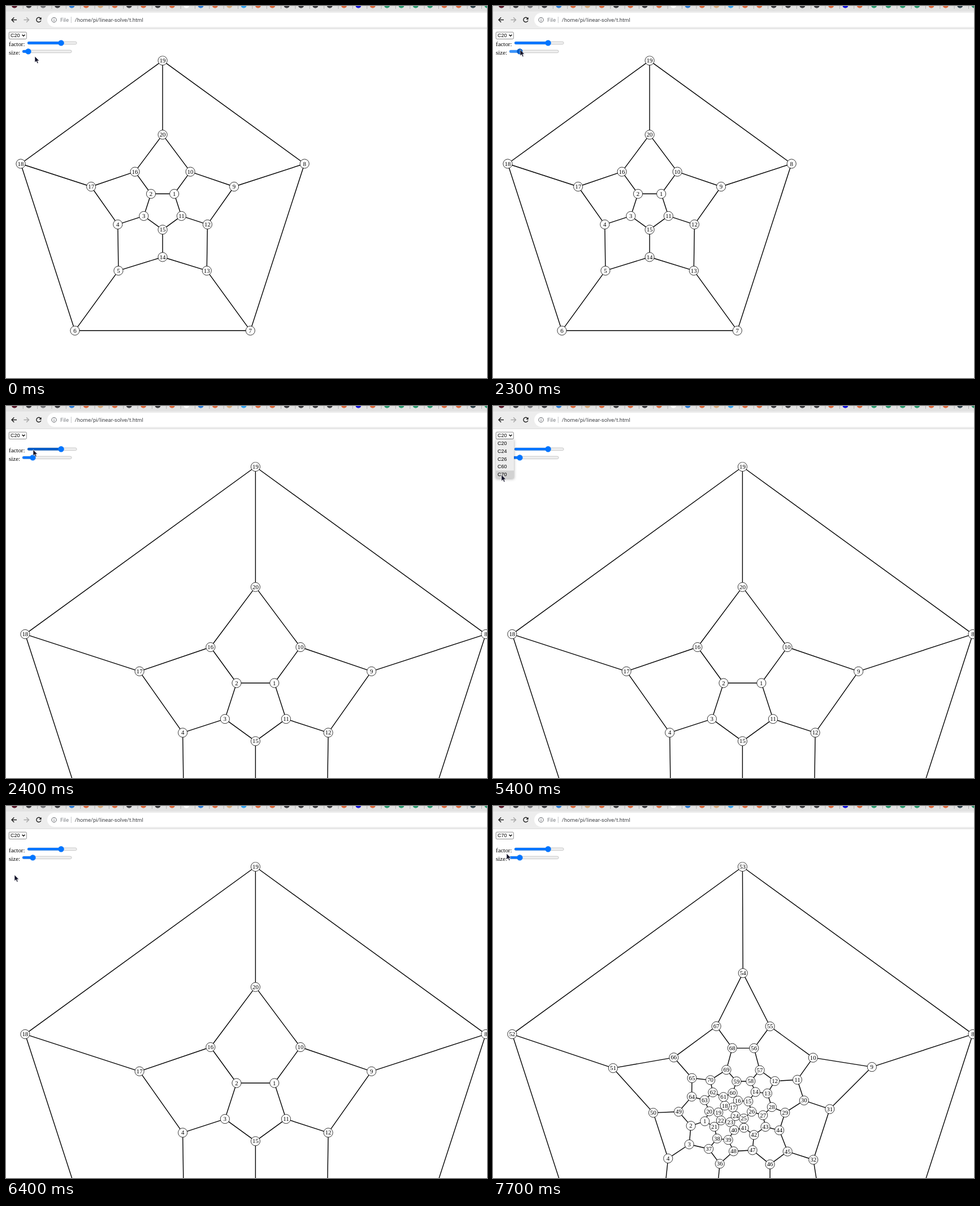
Animation, 851 px wide and 658 px high, one loop 8 s. Source, as an HTML page:

```html
<!DOCTYPE html>
<html lang="en">
<head>
<meta charset="utf-8">
<title>Fullerene graphs</title>
<style>
html, body { margin: 0; width: 100%; height: 100%; overflow: hidden; background: #fff; }
svg { display: block; }
.url { font: 9.58px Roboto, sans-serif; fill: #45474b; }
.ui { font: 9.1px "Liberation Sans", Arial, sans-serif; fill: #000; }
.page, .node text { font: 10.95px "Liberation Serif", "Times New Roman", serif; fill: #000; }
.node text { text-anchor: middle; }
.node circle { fill: #fff; stroke: #000; stroke-width: .8; }
.edges { fill: none; stroke: #000; stroke-width: 1.4; }
.track { fill: #efefef; stroke: #b2b2b2; stroke-width: .7; }
.fill, .thumb { fill: #0075ff; }

/* every change is a hard cut on one shared 8 s clock */
.t { animation: 8s step-end infinite; }
#cursor { animation-name: point; }
#controls { animation-name: drop; }
#small { animation-name: small; }
#large { animation-name: large; }
#c70, #val70 { animation-name: last; }
#val20 { animation-name: first; }
#popup { animation-name: popup; }
#items { animation-name: items; }
#factor .fill { animation-name: factorFill; }
#size .fill { animation-name: sizeFill; }
#size .thumb { animation-name: sizeThumb; }

@keyframes point {
  0% { transform: translate(51px, 89px); }
  1.25% { transform: translate(51px, 88.7px); }
  7.5% { transform: translate(50px, 80px); }
  13.75% { transform: translate(49.6px, 80px); }
  18.75% { transform: translate(49px, 78.5px); }
  22.5% { transform: translate(48px, 77.2px); }
  65% { transform: translate(20.3px, 53.3px); }
  67.5% { transform: translate(15px, 121.8px); }
  96.25% { transform: translate(24px, 84px); }
}
@keyframes drop { 0% { transform: none; } 30%, 100% { transform: translateY(10.9px); } }
@keyframes small { 0% { visibility: visible; } 30%, 100% { visibility: hidden; } }
@keyframes large { 0% { visibility: hidden; } 30% { visibility: visible; } 85%, 100% { visibility: hidden; } }
@keyframes first { 0% { visibility: visible; } 85%, 100% { visibility: hidden; } }
@keyframes last { 0% { visibility: hidden; } 85%, 100% { visibility: visible; } }
@keyframes popup { 0% { opacity: 0; } 65% { opacity: 1; } 80%, 100% { opacity: 0; } }
@keyframes items { 0% { opacity: 0; } 67.5% { opacity: 1; } 80%, 100% { opacity: 0; } }
@keyframes factorFill { 0% { fill: #0075ff; } 30% { fill: #005cc8; } 65%, 100% { fill: #0075ff; } }
@keyframes sizeFill {
  0% { fill: #0075ff; width: 10px; }
  7.5% { fill: #005cc8; width: 10px; }
  28.75% { fill: #3793ff; width: 18px; }
  30%, 100% { fill: #0075ff; width: 18px; }
}
@keyframes sizeThumb {
  0% { fill: #0075ff; transform: none; }
  28.75% { fill: #005cc8; transform: translateX(8px); }
  30%, 100% { fill: #0075ff; transform: translateX(8px); }
}
</style>
</head>
<body>
<svg width="851" height="658" viewBox="0 0 851 658">
  <defs>
    <clipPath id="clipSmall"><path d="M0 88.3H851V658H0z"/></clipPath>
    <clipPath id="clipLarge"><path d="M0 99.2H851V658H0z"/></clipPath>
  </defs>

  <rect width="851" height="40" fill="#ededed"/>
  <rect width="851" height="9.5" fill="#e2e2e2"/>
  <g id="tabs"></g>
  <path d="M0 40.3H851" stroke="#d2d2d2" stroke-width=".8"/>
  <rect x="73" y="12" width="800" height="25" rx="12.5" fill="#fff"/>
  <g fill="none" stroke-width="1.4">
    <path d="M19 24.5H10M14.3 20.2L10 24.5L14.3 28.8" stroke="#222"/>
    <path d="M31.5 24.5H40.5M36.2 20.2L40.5 24.5L36.2 28.8" stroke="#a6a6a6"/>
    <path d="M61.3 22A4.1 4.1 0 1 0 61.9 25.6" stroke="#222"/>
    <circle cx="85" cy="24.5" r="4.2" stroke="#5f6368" stroke-width="1"/>
    <path d="M85 24V26.8M85 22V23" stroke="#5f6368" stroke-width="1"/>
    <path d="M115.3 19V30" stroke="#b5b7ba" stroke-width=".8"/>
  </g>
  <path d="M62.6 19.8V23.9H58.5z" fill="#222"/>
  <text class="url" x="96" y="27.8" style="fill:#7b7f84">File</text>
  <text class="url" x="121.8" y="27.8">/home/pi/linear-solve/t.html</text>

  <g id="graphs"></g>

  <rect x="5.3" y="46.2" width="31" height="12.2" rx="1.6" fill="#fff" stroke="#707070" stroke-width=".8"/>
  <text class="ui t" id="val20" x="8" y="55.4">C20</text>
  <text class="ui t" id="val70" x="8" y="55.4">C70</text>
  <path d="M28.6 50.8L31 53.3L33.4 50.8" fill="none" stroke="#000" stroke-width="1.4"/>

  <g id="controls" class="t">
    <text class="page" x="5" y="71">factor:</text>
    <text class="page" x="5" y="86">size:</text>
  </g>

  <g id="popup" class="t">
    <rect x="5" y="59" width="32" height="69" fill="#ededed" style="filter:drop-shadow(0 1px 2.5px rgba(0,0,0,.35))"/>
    <g id="items" class="t"></g>
  </g>

  <path id="cursor" class="t" d="M0 0V10.8L2.5 8.6L4.4 12.6L6.2 11.8L4.4 7.9H7.8z" fill="#111127" stroke="#fff" stroke-width=".6"/>
</svg>
<script>
const NS = 'http://www.w3.org/2000/svg';
function add(parent, tag, attrs, text) {
  const el = document.createElementNS(NS, tag);
  for (const k in attrs) el.setAttribute(k, attrs[k]);
  if (text !== undefined) el.textContent = text;
  return parent.appendChild(el);
}
const $ = id => document.getElementById(id);

// Tab strip: one plain dot per tab
const tints = { r: '#5a1a2c', k: '#3c3c40', g: '#77777b', b: '#2f7fd8', o: '#dd6a3d', s: '#d9ab7c',
                w: '#ffffff', t: '#35a3ee', n: '#1414dc', e: '#2c9c70', d: '#31434b' };
[...'rkgkbosokokowbostookkkkonoeeeeoode'].forEach((c, i) => {
  const x = 15 + 25.35 * i;
  add($('tabs'), 'circle', { cx: x, cy: -1.2, r: 5, fill: tints[c] });
  add($('tabs'), 'path', { d: `M${x + 15.3} 0V5`, stroke: '#a2a2a2', 'stroke-width': .8 });
});

function slider(id, x, y, value) {
  const g = add($('controls'), 'g', { id });
  const bar = { x, y: y - 2.3, height: 4.6, rx: 2.3 };
  add(g, 'rect', { ...bar, width: 87, class: 'track' });
  add(g, 'rect', { ...bar, width: value, class: 'fill t' });
  add(g, 'circle', { cx: x + value, cy: y, r: 5.2, class: 'thumb t' });
}
slider('factor', 38, 65.4, 59.5);
slider('size', 29, 80.4, 10.4);

['C20', 'C24', 'C26', 'C60', 'C70'].forEach((name, i) => {
  const y = 59 + 13.8 * i;
  if (i === 4) add($('items'), 'rect', { x: 5, y, width: 32, height: 13.8, fill: '#d2d2d2' });
  add($('items'), 'text', { x: 8, y: y + 10, class: 'ui' }, name);
});

// Successive labels are joined except after a gap; chords complete the cubic graph
function makeGraph(count, outer, gaps, chords) {
  const edges = chords.split(' ').map(s => s.split('-').map(Number));
  for (let n = 1; n < count; n++) if (!gaps.includes(n)) edges.push([n, n + 1]);
  return { count, outer, edges };
}

// Outer face on a regular pentagon, every other node at the mean of its neighbours
function layout({ count, outer, edges }, cx, cy, r) {
  const pts = Array.from({ length: count + 1 }, () => [cx, cy]);
  const near = pts.map(() => []);
  for (const [a, b] of edges) { near[a].push(b); near[b].push(a); }
  outer.forEach((n, k) => {
    const a = k * Math.PI * 2 / 5;
    pts[n] = [cx + r * Math.sin(a), cy - r * Math.cos(a)];
  });
  const mean = (list, axis) => list.reduce((sum, n) => sum + pts[n][axis], 0) / list.length;
  for (let pass = 0; pass < 800; pass++) {
    for (let n = 1; n <= count; n++) {
      if (!outer.includes(n)) pts[n] = [mean(near[n], 0), mean(near[n], 1)];
    }
  }
  return pts;
}

function drawGraph(id, clip, graph, cx, cy, r) {
  const pts = layout(graph, cx, cy, r);
  const group = add($('graphs'), 'g', { id, class: 't', 'clip-path': `url(#${clip})` });
  const d = graph.edges.map(([a, b]) => `M${pts[a]}L${pts[b]}`).join('');
  add(group, 'path', { d, class: 'edges' });
  for (let n = 1; n <= graph.count; n++) {
    const [x, y] = pts[n];
    const node = add(group, 'g', { class: 'node' });
    add(node, 'circle', { cx: x, cy: y, r: 8.1 });
    add(node, 'text', { x, y: y + 3.6 }, n);
  }
}

const c20 = makeGraph(20, [19, 8, 7, 6, 18], [10, 15],
  '1-10 1-11 2-16 3-15 4-17 5-14 6-18 7-13 8-19 9-12 10-20 11-15 16-20');
const c70 = makeGraph(70, [53, 8, 7, 6, 52], [20, 48],
  '1-20 1-21 2-49 3-37 4-50 5-35 6-52 7-33 8-53 9-31 10-55 11-30 12-57 13-28 14-58 15-26 16-60 17-24 18-61 ' +
  '19-22 20-63 21-38 23-40 25-41 27-43 29-44 32-45 34-46 36-48 39-48 42-47 49-64 51-66 54-67 56-68 59-69 62-70 65-70');

drawGraph('small', 'clipSmall', c20, 277.1, 360.6, 264);
drawGraph('large', 'clipLarge', c20, 441.4, 536, 428.5);
drawGraph('c70', 'clipLarge', c70, 441.4, 536, 428.5);
</script>
</body>
</html>
```
